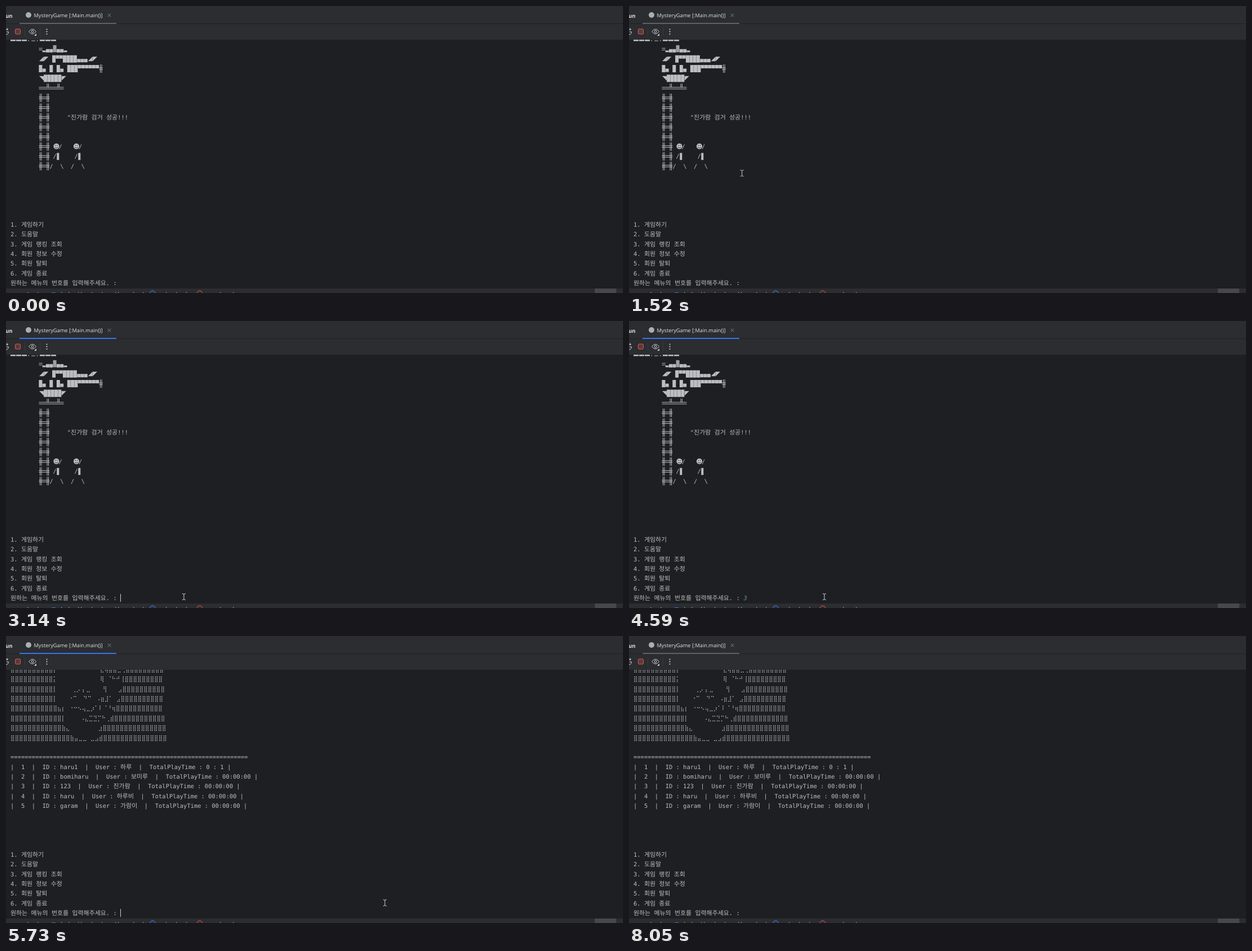
An HTML page that plays this animation: 1096x511 px, repeating every 8.25 s.

```html
<!DOCTYPE html>
<html lang="ko">
<head>
<meta charset="utf-8">
<title>Console menu</title>
<style>
html, body { margin: 0; width: 100%; height: 100%; overflow: hidden; background: #1e1f22; }
svg { display: block; width: 1096px; height: 511px; }
text { white-space: pre; text-rendering: geometricPrecision; fill: #bcbec4; }
.mono { font: 10.46px "DejaVu Sans Mono", "Liberation Mono", monospace; }
.ko { font: 10.95px "Noto Sans CJK KR", "Noto Sans CJK JP", "Noto Sans CJK", sans-serif; }
.dots { font: 10.31px "DejaVu Sans", sans-serif; }
.face { font: 11.5px "DejaVu Sans", sans-serif; }
.ui { font: 9.25px "Open Sans", "Noto Sans", sans-serif; fill: #dfe1e5; }
</style>
</head>
<body>
<svg id="stage" viewBox="0 0 1096 511">
  <defs><clipPath id="view"><rect y="60" width="1096" height="443"/></clipPath></defs>
  <rect width="1096" height="511" fill="#1e1f22"/>
  <g id="console" clip-path="url(#view)"></g>

  <rect width="1096" height="60" fill="#2b2d30"/>
  <rect y="31" width="1096" height="1" fill="#1e1f22"/>
  <text class="ui" x="11.5" y="20.5" text-anchor="end" style="font-weight:700;font-size:9.6px">Run</text>
  <circle cx="40" cy="16" r="5" fill="#a9b0b0"/>
  <text class="ui" x="49.5" y="20">MysteryGame [:Main.main()]</text>
  <path d="M180.7 13.7l5.6 5.6m0-5.6l-5.6 5.6" stroke="#868a91" fill="none"/>
  <rect id="underline" x="24" y="30" width="172" height="2"/>

  <g fill="none" stroke="#ced0d6">
    <path d="M0 41.5h3.5l-2 -2m2 2l-2 2M4.5 46c0 3-2 5-4.5 5m1-5h3.5"/>
    <path d="M33.5 38v15M60.5 38v15" stroke="#393b40"/>
    <rect x="16.5" y="41" width="9" height="9" rx="1.5" fill="#5e3838" stroke="#db5c5c"/>
    <path d="M40.5 45.5q6.5 -8.5 13 0q-6.5 8.500 -13 0z"/>
    <circle cx="47" cy="45.500" r="2"/>
  </g>
  <path d="M54 49v4h-4z" fill="#ced0d6"/>
  <g fill="#ced0d6"><circle cx="72.500" cy="41.500" r="1.100"/><circle cx="72.500" cy="45.700" r="1.100"/><circle cx="72.500" cy="50" r="1.100"/></g>

  <rect y="503" width="1096" height="8" fill="#2b2d30"/>
  <rect x="1046" y="503" width="38" height="8" fill="#46484b"/>
  <g id="status"></g>
  <rect x="81" y="510" width="7" height="1" fill="#3574f0"/>
  <circle cx="260.500" cy="512" r="5" fill="#25324d" stroke="#548af7"/>
  <circle cx="344" cy="512" r="5" fill="#402929" stroke="#db5c5c"/>

  <rect id="caret" y="486" width="1" height="14" fill="#ced0d6"/>
  <path id="pointer" d="M-3 -5.500q3 0 3 1.500q0 -1.500 3 -1.500M0 -4v8M-3 5.500q3 0 3 -1.500q0 1.500 3 1.500" fill="none" stroke="#d0d2d6"/>
</svg>
<script>
const LOOP = 8250, CELL = 6.3, PITCH = 17.35, LEFT = 8, INK = "#bcbec4";
const $ = id => document.getElementById(id);

function add(parent, tag, attrs = {}, text) {
  const node = document.createElementNS("http://www.w3.org/2000/svg", tag);
  for (const key in attrs) node.setAttribute(key, attrs[key]);
  if (text !== undefined) node.textContent = text;
  return parent.appendChild(node);
}

// Rows are counted upwards from the prompt.
const rowY = row => 493.2 - PITCH * row;

function write(parent, row, str, x = LEFT) {
  const line = add(parent, "text", { class: "mono", x, y: rowY(row) + 3.8 });
  for (const run of str.split(/([가-힣]+)/)) {
    if (run) add(line, "tspan", /[가-힣]/.test(run) ? { class: "ko" } : {}, run);
  }
  return line;
}

const box = (x, y, w, h) => `M${x} ${y}h${w}v${h}h${-w}z`;
const double = (x, y, w) => box(x, y - 2, w, 1) + box(x, y + 1, w, 1);
const rails = (x, y, h) => box(x + 1.6, y, 1, h) + box(x + 4, y, 1, h);
const TRI = 8.7;
const glyphs = {
  "█": (x, y) => box(x, y - 6.5, 6, 13),
  "▓": (x, y) => box(x, y - 7, 6, 12.5),
  "▀": (x, y) => box(x, y - 6.5, 6, 6),
  "▄": (x, y) => box(x, y, 6, 6),
  "▂": (x, y) => box(x, y + 2.5, 6, 3),
  "═": (x, y) => double(x, y, CELL),
  "╬": (x, y) => rails(x, y - 7.5, 15) + double(x, y, CELL),
  "╩": (x, y) => rails(x, y - 8, 7) + double(x, y, CELL),
  "◢": (x, y) => `M${x + .6} ${y + 4}h8v-8z`,
  "◤": (x, y) => `M${x + .2} ${y - 4}h8l-8 8z`,
  "◥": (x, y) => `M${x + .6} ${y - 4}h8v8z`,
};

function blocks(parent, row, str) {
  let x = LEFT + 8 * CELL, d = "";
  for (const ch of str) {
    if (ch === "▓") add(parent, "path", { d: glyphs[ch](x, rowY(row)), fill: "#98a19f" });
    else if (glyphs[ch]) d += glyphs[ch](x, rowY(row));
    x += "◢◤◥".includes(ch) ? TRI : CELL;
  }
  add(parent, "path", { d, fill: INK });
}

function menu(parent) {
  ["원하는 메뉴의 번호를 입력해주세요. : ", "6. 게임 종료", "5. 회원 탈퇴", "4. 회원 정보 수정",
    "3. 게임 랭킹 조회", "2. 도움말", "1. 게임하기"].forEach((str, row) => write(parent, row, str));
}

const arrest = add($("console"), "g"), ranking = add($("console"), "g");

// Arrest scene
["◥█████◤", "█▄ █ █▄ ███▀▀▀▀▀▀╬", "◢◤ █▀▀████▄▄▄◢◤", "═▂▄▄▓▄▄▂"]
  .forEach((str, i) => blocks(arrest, 21 + i, str));
blocks(arrest, 20, "══╩══╩═");
for (let row = 12; row < 20; row++) blocks(arrest, row, "╬═╬");
for (const x of [8, 18, 28, 60, 70, 80]) add(arrest, "path", { d: box(x, 59, 9, 3.5), fill: INK });
add(arrest, "path", { d: box(39.5, 61, 1.5, 1.5) + box(55, 61, 1.5, 1.5) + box(45, 61.5, 7, 1), fill: INK });
write(arrest, 17, '"진가람 검거 성공!!!', LEFT + 16 * CELL);
for (const [x, lean] of [[84, 0], [119.5, 2.5]]) {
  add(arrest, "text", { class: "face", x: x - .5, y: rowY(14) + 4 }, "☻");
  write(arrest, 14, "/", x + 9.5);
  write(arrest, 13, "/", x + lean - .5);
  add(arrest, "path", { d: box(x + lean + 6.3, rowY(13) - 6, 4, 12.5), fill: INK });
}
[[77.5, "/"], [96.3, "\\"], [115, "/"], [133.8, "\\"]].forEach(([x, ch]) => write(arrest, 12, ch, x));
menu(arrest);
const answer = write(arrest, 0, "3", 203.6);
answer.style.fontStyle = "italic";

// Ranking: dotted picture as runs of [x, text]; a number stands for that many full cells.
const picture = [
  [[8, 14, "⣷⣤⣀⣀"], [150, "⣀⣠⣾", 15]],
  [[8, 12, "⣷⣄"], [164, "⣰", 15]],
  [[8, 12, "⡇"], [132, "⠠⣄⣉⣙⡉⠓"], [177, "⢀⣾", 12]],
  [[8, 11, "⣦⡆"], [112, "⠐⠒⠢⢤⣀⡰⠁⠇⠈⠘⢶", 11]],
  [[8, 10, "⡇"], [111, "⠐⠉"], [137, "⠙⠉"], [160, "⠠⣶⣸⠁"], [196, "⣠", 10]],
  [[8, 10, "⡇"], [117, "⢀⡠"], [135, "⡄⣀"], [172, "⢻"], [199, "⣠", 10]],
  [[8, 10, "⡅"], [167, "⢿"], [180, "⠈⠓⠚"], [203, "⢸", 9]],
  [[8, 10, "⡇"], [167, "⣄⢴⣿⣥⣀⢀", 9]],
];
picture.forEach((runs, i) => {
  for (const [x, ...parts] of runs) {
    const str = parts.map(p => typeof p === "number" ? "⣿".repeat(p) : p).join("");
    add(ranking, "text", { class: "dots", x, y: rowY(18 + i) + 3.6 }, str);
  }
});
write(ranking, 16, "=".repeat(67));
[["haru1", "하루", "0 : 1"], ["bomiharu", "보미루"], ["123", "진가람"], ["haru", "하루비"], ["garam", "가람이"]]
  .forEach(([id, user, time = "00:00:00"], i) =>
    write(ranking, 15 - i, `|  ${i + 1}  |  ID : ${id}  |  User : ${user}  |  TotalPlayTime : ${time} |`));
menu(ranking);

// Tops of the cut-off status labels
for (const x of [38, 56, 98, 111, 128, 133, 152, 170, 194, 199, 226, 243, 284, 302, 320, 380, 403])
  add($("status"), "rect", { x, y: 509.5, width: 1.5, height: 1.5, fill: "#8b8e94" });

// Pointer moves: start, step length, step count, goal x, goal y, easing
const linear = u => u;
const moves = [
  [70, 73, 4, 646, 447, linear],
  [430, 67, 8, 145, 257, u => 1 - (1 - u) ** 1.23],
  [1310, 70, 12, 312, 379, linear],
  [2340, 70, 1, 314, 374, linear],
  [2410, 73, 11, 316, 491, linear],
  [3200, 78, 6, 347, 491, linear],
  [5400, 66, 6, 673, 475, u => u ** 1.6],
  [6170, 72, 7, 975, 490, linear],
];
const carets = [[3070, 3590, 203], [4060, 4590, 210], [5730, 5800, 203], [6170, 6650, 203], [7190, 7650, 203]];

function pointerAt(t) {
  let x = 1000, y = 524;
  for (const [start, step, count, goalX, goalY, ease] of moves) {
    if (t < start) break;
    const done = Math.min(count, Math.floor((t - start) / step) + 1);
    const p = ease(done / count);
    x += (goalX - x) * p;
    y += (goalY - y) * p;
  }
  return [x, y];
}

const show = (node, on) => node.setAttribute("visibility", on ? "visible" : "hidden");

function render(t) {
  const entered = t >= 4660, listed = t >= 5730;
  show(arrest, !listed);
  show(ranking, listed);
  arrest.setAttribute("transform", `translate(0 ${entered ? -PITCH : 0})`);
  answer.setAttribute("display", t >= 4060 ? "inline" : "none");
  answer.style.fill = entered ? "#858b88" : "#59a869";
  $("underline").setAttribute("fill", t >= 3070 && t < 8050 ? "#3574f0" : "#5e6167");

  const caret = carets.find(([from, to]) => t >= from && t < to);
  show($("caret"), caret);
  if (caret) $("caret").setAttribute("x", caret[2]);

  show($("pointer"), t >= 70 && t < 6650);
  $("pointer").setAttribute("transform", `translate(${pointerAt(t).join(" ")})`);
}

let origin;
function tick(now) {
  origin ??= now;
  render((now - origin) % LOOP);
  requestAnimationFrame(tick);
}
render(0);
requestAnimationFrame(tick);
</script>
</body>
</html>
```
